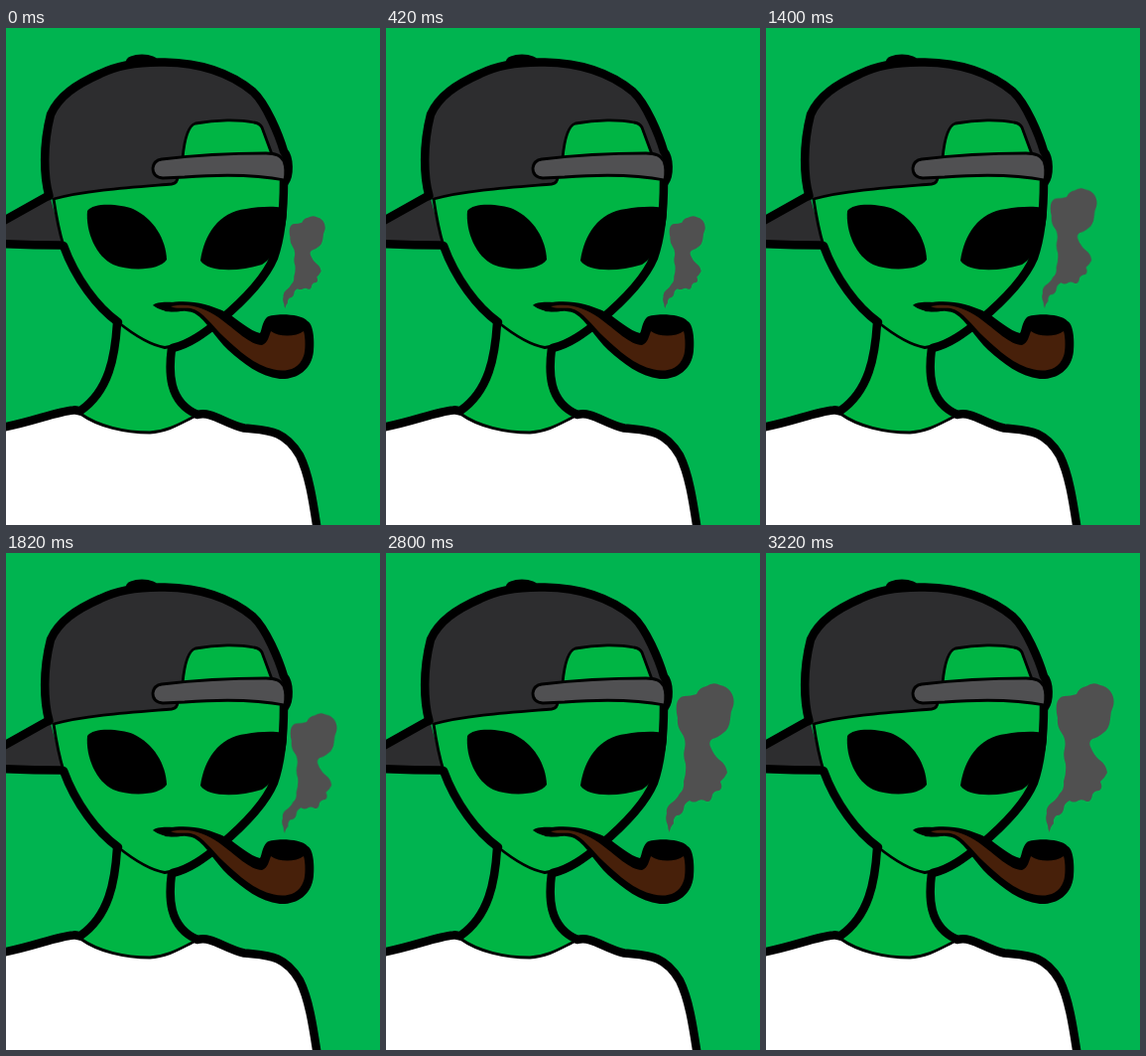
Recreate the animation shown at these times as an HTML page. Size 377 by 500 pixels, loop 3.5 s.

```html
<!DOCTYPE html>
<html lang="en">
<head>
<meta charset="utf-8">
<title>Pipe smoke</title>
<style>
  html, body { margin: 0; width: 100%; height: 100%; overflow: hidden; background: #00b450; }
  svg { display: block; width: 100%; height: 100%; }
  .skin { fill: #00b544; }
  .cap { fill: #2d2d2f; }
  .thick, .thin { stroke: #000; stroke-linejoin: round; stroke-linecap: round; }
  .thick { stroke-width: 8.5; }
  .thin { stroke-width: 2.8; }
  .line { fill: none; }
  .smoke {
    fill: #505050;
    transform-origin: 282px 281px;
    animation: puff 3.5s step-end infinite;
  }
  @keyframes puff {
    0%   { transform: translate(-3px, 1px) scale(.623, .62); }
    20%  { transform: translate(-1px, 1px) scale(.783, .693); }
    40%  { transform: translate(-4px, 1px) scale(.81, .807); }
    60%  { transform: translate(-3px, 1px) scale(.9, .893); }
    80%, 100% { transform: none; }
  }
</style>
</head>
<body>
<svg viewBox="0 0 377 500">
  <!-- neck -->
  <path class="skin" d="M112 292C110 330 104 365 74 388C93 401 120 407 145 407C165 406 180 395 193 390C165 380 163 345 167 318Z"/>
  <!-- shirt -->
  <path fill="#fff" d="M-5 402C25 397 50 387 68 385L75 388C93 401 120 407 145 407C165 406 180 395 192 390C205 385 220 398 240 403C262 405 280 403 296 430C306 450 310 480 314 506H-5Z"/>
  <path class="thin line" d="M75 388C93 401 120 407 145 407C165 406 180 395 192 390"/>
  <path class="thick line" d="M-5 402C25 397 50 386 68 384.500Q71 384 74 385.500M112 297C110 330 104 365 75 385M167 322C164 345 163 376 193 389C207 385 220 398 240 402.500C262 405 280 403 296 430C306 450 310 480 314 506"/>

  <!-- brim -->
  <path class="cap" d="M-6 196L44 168L58 219C35 219 15 218 -6 217Z"/>
  <path class="thick line" d="M-6 196L44 168M56 218.500C35 218.500 15 218 -6 217"/>

  <!-- face -->
  <path class="skin" d="M48 172C51 192 54 206 58 219C70 252 92 281 113 296C128 308 146 319 160 321.500C185 318 200 307 216 294C241 273 262 250 270 231C277 211 280 185 280 148L170 140Z"/>
  <path class="thin line" d="M48 172C51 192 54 206 58 219M113 296C128 308 146 319 160 321.500L168 320"/>
  <path class="thick line" d="M58 219C70 252 92 281 113 296M168 322C185 318 200 307 216 294C241 273 262 250 270 231C277 211 280 185 280 154"/>

  <!-- cap -->
  <ellipse cx="137" cy="33.500" rx="16" ry="7"/>
  <path class="cap" d="M47 172C38 150 37 118 45 87C53 69 70 57 95 46C115 36 140 34 160 34.500C197 35 227 46 249 64C262 76 277 107 281 124L281 145L173 150Q173 156 167 157C130 160 80 163 47 172Z"/>
  <path class="thin line" d="M48 172C80 163 130 160 167 157Q173 156 173 150"/>
  <path class="thick line" d="M43.500 169C38 150 37 118 45 87C53 69 70 57 95 46C115 36 140 34 160 34.500C197 35 227 46 249 64C262 76 275 107 280 124C286 131 286 148 281 155"/>
  <path class="skin thin" d="M178 131C180 110 184 98 191 96C212 92 236 92 250 95Q256 96 258 100L268 127Z"/>
  <path class="thin" fill="#505052" d="M157 132C190 128 230 126 262 126Q277 126 280 134Q283 142 281 153C255 148 220 147 180 150L158 151Q148 150 148 141Q149 133 157 132Z"/>

  <!-- eyes -->
  <path d="M82 184C88 175 115 177 128 182C149 192 161 212 162 233C155 244 125 245 108 238C91 230 80 205 82 184Z"/>
  <path d="M283 183C281 179 258 179 242 182C214 185 200 208 196 234C203 245 232 246 258 238C272 230 283 205 283 183Z"/>

  <!-- mouth and pipe -->
  <path d="M148 279C152 274 175 275 186 280C180 287 160 288 148 279Z"/>
  <path d="M163 276.500C185 273 202 277 222 286C235 294 246 305 256 307C258 304 258 296 263 291C270 287 297 287 304 295C310 298 311 315 310 325C308 345 292 354 276 353C255 350 240 338 224 324C210 311 203 295 190 287C180 283 170 286 160 285Z"/>
  <path fill="#47200a" d="M166 280C188 276 201 283 214 291C232 304 246 319 258 319C264 317 265 310 267 305C275 311 292 311 300 305C302 311 302 325 300 330C295 345 280 346 270 343.500C250 339 235 325 220 311C207 299 199 285 186 282C178 281 172 283 166 280Z"/>

  <path class="smoke" d="M286 281Q284 278 284 274Q281 268 283 262Q282 256 287 252Q293 248 296 242Q301 238 300 230Q303 221 302 212Q299 204 301 197Q303 188 298 181Q293 174 294 166Q292 159 293 152Q295 144 301 144Q307 144 313 142Q316 135 323 134Q330 129 337 133Q343 134 347 139Q352 146 350 154Q347 160 347 167Q346 177 340 181Q334 186 329 187Q324 190 328 197Q331 204 336 208Q343 213 344 221Q341 227 337 230Q340 237 336 239Q331 239 329 243Q328 251 323 250Q319 247 315 249Q310 252 306 249Q300 252 300 258Q298 264 293 264Q289 267 290 272Q286 276 286 281Z"/>
</svg>
</body>
</html>
```
